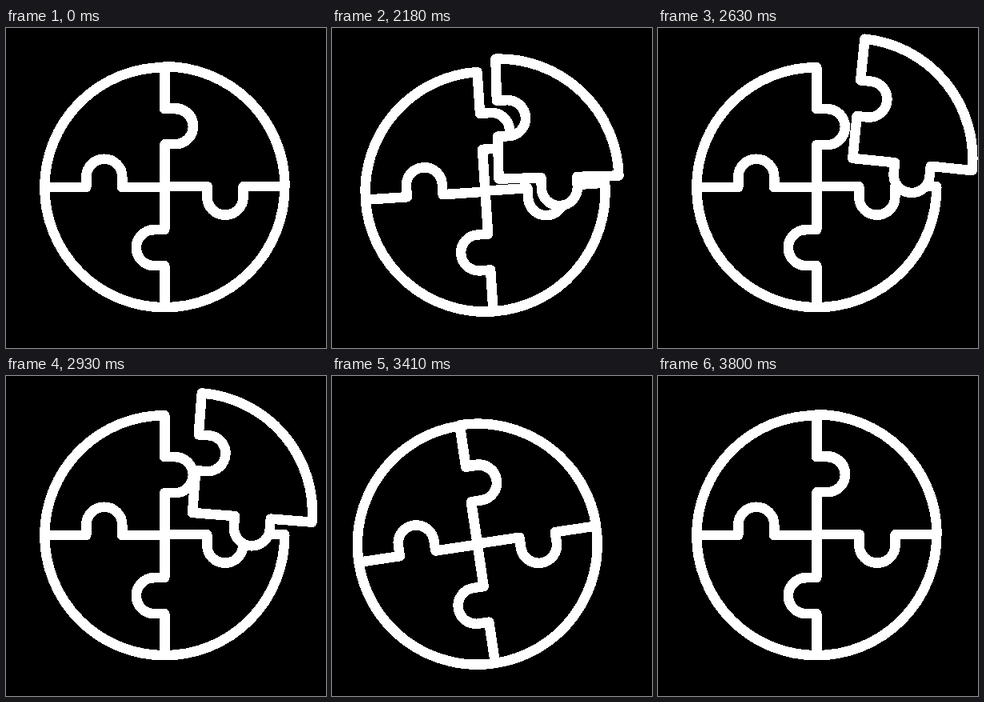
Recreate the animation shown at these times as an HTML page. Size 400x400 px, loop 3830 ms.

```html
<!DOCTYPE html>
<html lang="en">
<head>
<meta charset="utf-8">
<title>Puzzle circle</title>
<style>
  html, body { margin: 0; height: 100%; overflow: hidden; background: #000; }
  svg { display: block; width: 100vw; height: 100vh; }
</style>
</head>
<body>
<svg viewBox="0 0 400 400" shape-rendering="crispEdges">
  <defs>
    <path id="spoke" d="M0-150V-98H13a22.5 22.5 0 0 1 0 45H0V0"/>
  </defs>
  <g id="puzzle" fill="none" stroke="#fff" stroke-width="12.5" stroke-linecap="round" stroke-linejoin="round">
    <path d="M150 0A150 150 0 1 1 0-150"/>
    <use href="#spoke"/>
    <use href="#spoke" transform="translate(0 -1) rotate(90)"/>
    <use href="#spoke" transform="rotate(180)"/>
    <use href="#spoke" transform="rotate(270)"/>
    <path id="piece" fill="#000" d="M0-150V-98H13a22.5 22.5 0 0 1 0 45H0V0H53V13a22.5 22.5 0 0 0 45 0V0H150A150 150 0 0 0 0-150Z"/>
  </g>
</svg>
<script>
const LOOP = 3830, HOLD = 2030, STEP = 30;
const puzzle = document.getElementById('puzzle');
const piece = document.getElementById('piece');

// Rises from 0 at start to 1 at peak, then falls back to 0 at end.
function bump(n, start, peak, end, risePower, fallPower) {
  if (n <= start || n >= end) return 0;
  return n < peak
    ? Math.sin(Math.PI / 2 * (n - start) / (peak - start)) ** risePower
    : Math.cos(Math.PI / 2 * (n - peak) / (end - peak)) ** fallPower;
}

function draw(time) {
  const t = time % LOOP;
  const n = t < HOLD ? 0 : Math.floor((t - HOLD) / STEP) + 1;

  // The whole circle recoils as the piece leaves and again when it lands.
  const tilt = 5.9 * bump(n, 0, 3.3, 10, 1.5, 2) + 9.1 * bump(n, 38, 45, 60, 2, 3);
  const x = 198.3 - tilt * (1.6 + 0.04 * tilt);
  const y = 199.2 + tilt * (1.5 - 0.018 * tilt);
  puzzle.setAttribute('transform', `translate(${x} ${y}) rotate(${-tilt})`);

  // The piece is thrown out and falls back.
  const out = Math.max(0, 1 - (Math.abs(n - 21) / 18.5) ** 2.4);
  piece.setAttribute('transform',
    `translate(${0.3 + 44.7 * out} ${-1 - 35.3 * out}) rotate(${5.8 * out})`);
}

const begin = performance.now();
function tick() {
  draw(performance.now() - begin);
  requestAnimationFrame(tick);
}
tick();
</script>
</body>
</html>
```
